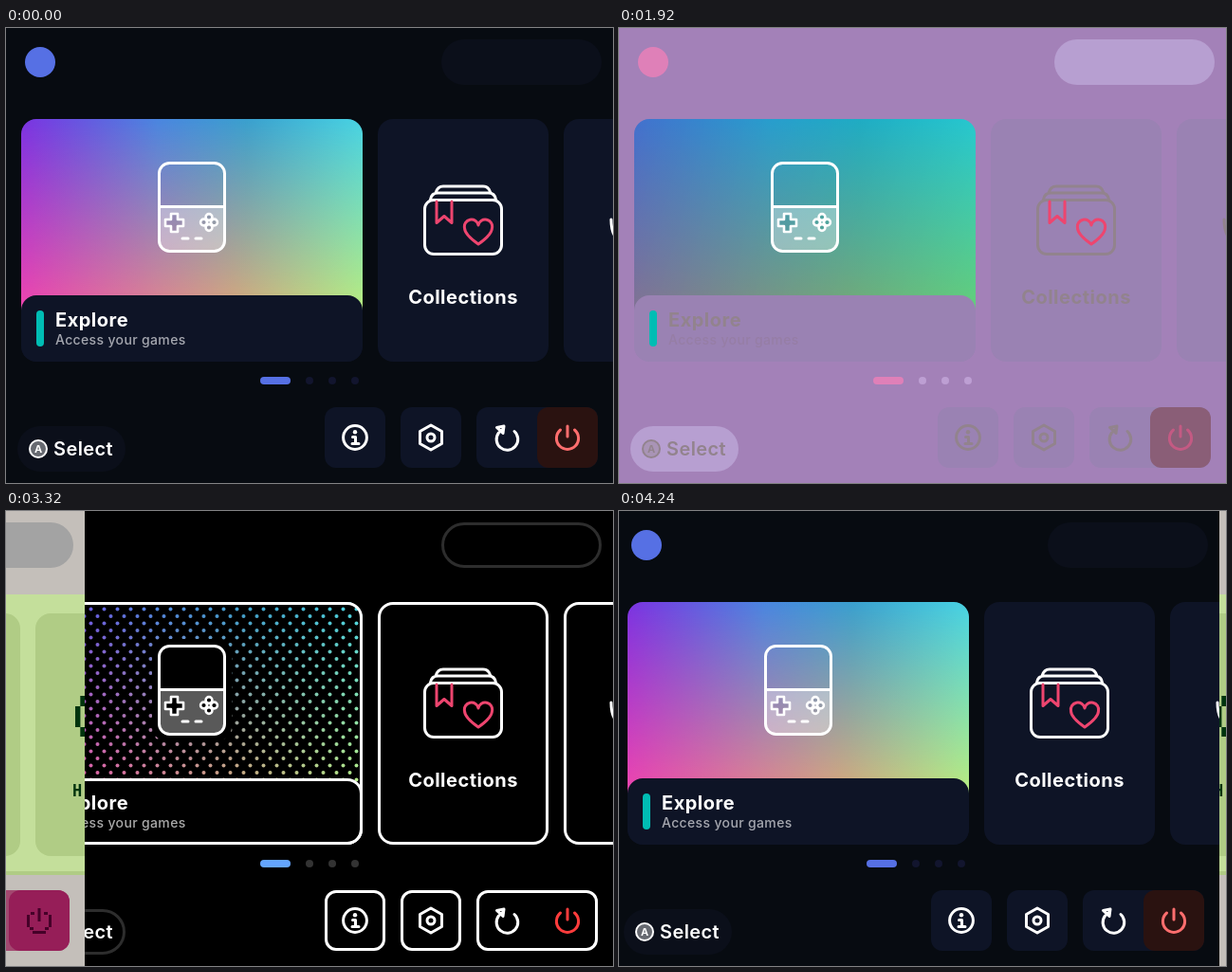
An HTML page that plays this animation: 640x480 px, repeating every 4280 ms.

```html
<!DOCTYPE html>
<html lang="en">
<head>
<meta charset="utf-8">
<title>Launcher themes</title>
<style>
html, body { margin: 0; width: 100%; height: 100%; overflow: hidden; background: #000; }
svg { display: block; width: 640px; height: 480px; }
text { font-family: Inter, "Open Sans", sans-serif; }
.title { font-size: 20px; font-weight: 700; letter-spacing: .5px; }
.sub { font-size: 14px; font-weight: 500; letter-spacing: .35px; }
.hint { font-size: 20px; font-weight: 600; letter-spacing: .4px; }
.key { font-size: 11px; font-weight: 700; text-anchor: middle; }
.mid { text-anchor: middle; }
.pixel text { font-family: "DejaVu Sans Mono", monospace; font-weight: 700; }
.pixel .title { font-size: 17px; letter-spacing: 3.8px; }
.pixel .sub { font-size: 12.5px; font-weight: 400; letter-spacing: 2.5px; }
.pixel .hint, .pixel .key { font-family: Inter, sans-serif; }
</style>
</head>
<body>
<svg id="stage" viewBox="0 0 640 480">
<defs>
  <clipPath id="screen"><path d="M0 0h640v480H0z"/></clipPath>
  <clipPath id="card"><rect x="16" y="96" width="360" height="256" rx="16"/></clipPath>
  <clipPath id="retroCard"><rect x="16" y="108" width="360" height="256" rx="16"/></clipPath>
  <linearGradient id="cool">
    <stop stop-color="#7b33e2"/><stop offset=".4" stop-color="#4a86e0"/>
    <stop offset=".66" stop-color="#3aa0cf"/><stop offset="1" stop-color="#48d3e4"/>
  </linearGradient>
  <linearGradient id="warm">
    <stop stop-color="#f045ae"/><stop offset=".62" stop-color="#d9a67c"/><stop offset="1" stop-color="#b9ec7f"/>
  </linearGradient>
  <linearGradient id="fall" x2="0" y2="1"><stop stop-color="#000"/><stop offset="1" stop-color="#fff"/></linearGradient>
  <linearGradient id="sea" x2="0" y2="1"><stop stop-color="#00bbb8"/><stop offset="1" stop-color="#00aa73"/></linearGradient>
  <linearGradient id="sky" x2="0" y2="1">
    <stop stop-color="#74d0d0"/><stop offset=".2" stop-color="#68c0bd"/><stop offset="1" stop-color="#5fae9f"/>
  </linearGradient>
  <mask id="lower" style="mask-type:luminance"><rect x="16" y="96" width="360" height="202" fill="url(#fall)"/></mask>
  <pattern id="dots" x="16" y="96" width="14" height="15" patternUnits="userSpaceOnUse">
    <g fill="#fff"><circle cx="3.5" cy="7.5" r="2"/><circle cx="10.5" cy="15" r="2"/><circle cx="10.5" cy="0" r="2"/></g>
  </pattern>
  <mask id="dotted"><rect x="16" y="96" width="360" height="202" fill="url(#dots)"/></mask>
  <filter id="soft"><feGaussianBlur stdDeviation="2.5"/></filter>
  <g id="rainbow">
    <rect x="16" y="96" width="360" height="202" fill="url(#cool)"/>
    <rect x="16" y="96" width="360" height="202" fill="url(#warm)" mask="url(#lower)"/>
  </g>
  <path id="halfHeart" d="M2 .5h4M1 1.5h1M6 1.5h1M7 2.5h1M.5 2v6M1 8.5h1M2 9.5h1M3 10.5h2M5 11.5h1M6 12.5h1M7 13.5h1"/>
</defs>
</svg>
<script>
const LOOP = 4280, STEP = 40, FADE = 88, SLIDE = 240;
const STARTS = [440, 1160, 1880, 2588.5, 3288.9, 4002.6];
const stage = document.getElementById('stage');

const rainbow = '<use href="#rainbow"/>';
const themes = [
  { bg: '#070b11', card: '#0e1426', pill: '#0b0f1a', text: '#fff', muted: '#a6a8b0', accent: '#5670e4',
    dot: '#12152e', offBg: '#2a1210', off: '#ff6e6e', art: rainbow },
  { bg: '#f8fffa', card: '#dae7f5', pill: '#ebf2f6', text: '#0d1424', muted: '#566070', accent: '#1b84ff',
    dot: '#dae4f5', offBg: '#ffd0d0', off: '#c40000', art: rainbow },
  { bg: '#edafc6', card: '#ebc1ce', pill: '#f2c5dc', text: '#371c2e', muted: '#714474', accent: '#ff4a7e',
    dot: '#fec9df', offBg: '#eb999c', off: '#cc1421', art: rainbow },
  { bg: '#4d4ba9', card: '#3b3994', pill: '#7373c4', text: '#fff', muted: '#c3c3e1', accent: '#bac2ff',
    dot: '#706ec6', offBg: '#18184c', off: '#baaff9',
    art: '<rect x="16" y="96" width="360" height="202" fill="url(#sea)"/>' },
  { bg: '#000', card: '#000', pill: '#000', text: '#fff', muted: '#aaa', accent: '#64a5ff',
    dot: '#333', offBg: 'none', off: '#ff3c3c', edge: '#fff', pillEdge: '#2d2d2d',
    art: `<path d="M16 96h360v202H16z"/><g mask="url(#dotted)">${rainbow}</g>
      <rect x="154" y="135" width="84" height="108" rx="16"/>` }
];

function box(x, y, w, h, r, fill, edge) {
  const d = edge ? 1.5 : 0;
  return `<rect x="${x + d}" y="${y + d}" width="${w - 2 * d}" height="${h - 2 * d}" rx="${r - d}" fill="${fill}"` +
    (edge ? ` stroke="${edge}" stroke-width="3"` : '') + '/>';
}
const line = (d, color, width = 3) =>
  `<path d="${d}" fill="none" stroke="${color}" stroke-width="${width}" stroke-linecap="round" stroke-linejoin="round"/>`;
const pixels = (d, color, width = 3) => `<path d="${d}" fill="none" stroke="${color}" stroke-width="${width}"/>`;
const label = (x, y, kind, color, str) => `<text x="${x}" y="${y}" class="${kind}" fill="${color}">${str}</text>`;
const ring = (x, y, r) => `M${x - r} ${y}a${r} ${r} 0 1 0 ${2 * r} 0a${r} ${r} 0 1 0 ${-2 * r} 0z`;

function selectHint(pill, text, edge, key, keyFill) {
  return box(12, 420, 114, 48, 24, pill, edge) +
    `<circle cx="34" cy="444" r="9" fill="${keyFill}" fill-opacity=".38" stroke="${key}" stroke-width="2"/>` +
    label(34, 448, 'key', key, 'A') + label(50, 451, 'hint', text, 'Select');
}

function handheld() {
  const cross = 'M174 196h7v6h6v7h-6v6h-7v-6h-6v-7h6z';
  const petals = [[214, 199.5], [208.5, 205], [219.5, 205], [214, 210.5]].map(p => ring(...p, 3.4)).join('');
  return `<path fill="#fff" fill-opacity=".35" fill-rule="evenodd"
      d="M161 189h70v36q0 11-11 11h-48q-11 0-11-11z${cross}${petals}"/>` +
    box(160, 141, 72, 96, 12.5, 'none', '#fff') + line('M162 188.5h68', '#fff') +
    line(cross + petals, '#fff', 2.6) + line('M186 222h6M200 222h6', '#fff');
}

function folder(color) {
  const red = '#ee456f';
  return box(440, 180, 84, 60, 11, 'none', color) +
    line('M447.5 181q1-7 8-7h53q7 0 8 7M453 174q2-7 8-7h42q6 0 8 7', color) +
    line('M454 183v22.5l8-7 8 7V183', red) +
    line('M498 228C488 221 483.5 216 483.5 211A7.3 7.3 0 0 1 498 208A7.3 7.3 0 0 1 512.5 211C512.5 216 508 221 498 228z', red);
}

function modern(t) {
  const { text, edge } = t;
  return `<path d="M0 0h640v480H0z" fill="${t.bg}"/>
    <circle cx="36" cy="36" r="16" fill="${t.accent}"/>` +
    box(459, 12, 169, 48, 24, t.pill, t.pillEdge) +
    `<g clip-path="url(#card)">${box(16, 96, 360, 256, 16, t.card)}${t.art}</g>` +
    handheld() + box(16, 282, 360, 70, 16, t.card, edge) +
    (edge ? box(16, 96, 360, 256, 16, 'none', edge) : '') +
    box(32, 298, 8, 38, 4, '#00bdb4') +
    label(52, 315, 'title', text, 'Explore') + label(52, 334, 'sub', t.muted, 'Access your games') +
    box(392, 96, 180, 256, 16, t.card, edge) + folder(text) + label(482, 291, 'title mid', text, 'Collections') +
    box(588, 96, 180, 256, 16, t.card, edge) + line('M638 202q0 13 5 19', text) +
    box(268, 368, 32, 8, 4, t.accent) + [320, 344, 368].map(x => box(x - 4, 368, 8, 8, 4, t.dot)).join('') +
    box(336, 400, 64, 64, 12, t.card, edge) + box(416, 400, 64, 64, 12, t.card, edge) +
    box(496, 400, 128, 64, 12, t.card, edge) + box(560, 400, 64, 64, 12, t.offBg) +
    line(ring(368, 432, 12.4) + 'M365.5 431.5h3v7M365 438.5h7', text) +
    `<circle cx="368" cy="426.3" r="2.2" fill="${text}"/>` +
    line('M448 419l11.5 6.5v13L448 445l-11.5-6.5v-13z' + ring(448, 432, 4), text) +
    line('M536 425.5A11.3 11.3 0 1 1 519.5 427L524 423M517.5 421.5l7.500-1.500-1 7.500z', text) +
    line('M584.5 424A11.6 11.6 0 1 0 599.5 424M592 420v11', t.off) +
    selectHint(t.pill, text, t.pillEdge, text, text);
}

function scenery() {
  const dark = '#1d6d62', faint = '#459489';
  return `<g clip-path="url(#retroCard)"><rect x="16" y="108" width="360" height="210" fill="url(#sky)"/>
    <g filter="url(#soft)">
      <path d="M10 236h82v14H10zM219 272h125v15H219zM345 236h40v14h-40z" fill="${dark}"/>
      <path d="M58 258h14v14H58zM58 280h14v14H58zM361 258h14v14h-14zM361 280h14v14h-14zM228 294h14v12h-14zM318 294h14v12h-14z" fill="#80c4b5" opacity=".6"/>` +
    pixels(ring(66, 173, 8) + ring(82, 173, 7) + ring(371, 173, 8) + ring(280, 209, 7) +
      'M214 176q18-8 34 0t10 18q-16 8-26-2', faint, 5) +
    pixels('M289 250l-6 10-9 8M134 283l-7 10-9 8M188 276q-18-6-16 6l14 4-2 10h-14M144 105h12', faint, 6) +
    '</g></g>';
}

function retro() {
  const leaf = '#b0cc85', ink = '#00340e', grey = '#a3a3a3', pale = '#c4bfba', wine = '#450028';
  return `<path d="M0 0h640v480H0z" fill="${pale}"/><path d="M0 88h640v296H0z" fill="#c4df9b"/>
    <circle cx="36" cy="36" r="16" fill="#4b4a94"/>` + box(459, 12, 169, 48, 24, grey) +
    [0, 164, 328, 492].map((x, i) => box(x, 380, 148, 4, 0, i ? leaf : ink)).join('') +
    scenery() + box(16, 304, 360, 60, 16, leaf) + box(32, 320, 8, 28, 4, '#00bdb4') +
    pixels('M164 160.7h65M161 163v85M231.300 163v85M164 246h11M218 246h11M175 251.500h43' +
      'M171.500 171.500h48.500v37h-48.500zM169 224h17M177.500 216v16M180 240.500h10M198 240.500h13' +
      'M211.500 219h5.500M206 224.300h5.500M217 224.300h5.500M211.500 229.600h5.500', '#fff', 5.3) +
    label(51, 332, 'title', ink, 'Explore') + label(51, 347, 'sub', '#3c6a36', 'Access your games') +
    box(392, 108, 180, 256, 16, leaf) +
    `<g transform="translate(439 179)scale(5.4)" stroke="${ink}"><use href="#halfHeart"/>
      <use href="#halfHeart" transform="translate(16)scale(-1 1)"/></g>` +
    label(425, 301, 'title', ink, 'Collect.') +
    box(588, 108, 180, 256, 16, leaf) + pixels('M638 195v11M632.700 206v22M638 228v10', ink, 5.4) +
    label(627, 301, 'title', ink, 'History') +
    box(336, 400, 64, 64, 12, '#262929') + box(416, 400, 64, 64, 12, '#262929') +
    box(496, 400, 128, 64, 12, '#a34870') + box(560, 400, 64, 64, 12, '#961e58') +
    pixels('M359 419.500h18M355.500 423v18M380.500 423v18M359 444.500h18M357 422h3M376 422h3M357 442h3M376 442h3' +
      'M366 425.500h5M365 431.500h4.500v9M365 439h8', pale) +
    pixels('M437 419.500h22M435.500 421v22M460.500 421v22M437 444.500h22M440.500 425.500h6v6h-6z' +
      'M449.500 427h8M449.500 435.500h6v5h-6zM439 436h7M439 441h5', pale, 2.6) +
    pixels('M518 425.500h15M522 421v9M526 418v15M533 429h4M537.500 429v11M533 440.500h3M519 443.500h15M517.500 436v6', wine) +
    pixels('M592 419v14M583 424.500h4M597 424.500h4M580.500 426v13M603.500 426v13M582 440.500h4M598 440.500h4M585 444.500h14', wine) +
    selectHint(grey, '#191e1e', '', '#9c1e52', '#ff4c88');
}

function scene(markup, name) {
  const g = document.createElementNS('http://www.w3.org/2000/svg', 'g');
  g.setAttribute('clip-path', 'url(#screen)');
  g.setAttribute('class', name);
  g.innerHTML = markup;
  return stage.appendChild(g);
}
const scenes = themes.map(t => scene(modern(t), 'modern'));
scenes.push(scene(retro(), 'pixel'));

function show(t) {
  const i = STARTS.findLastIndex(s => t >= s);
  const slides = i >= 4;
  const k = i < 0 ? 1 : Math.min(1, (t - STARTS[i]) / (slides ? SLIDE : FADE));
  const next = scenes[(i + 1) % scenes.length];
  const last = scenes[Math.max(i, 0)];
  for (const g of scenes) {
    g.style.display = g === next || g === last ? '' : 'none';
    g.setAttribute('opacity', 1);
    g.setAttribute('transform', 'translate(0)');
  }
  if (stage.lastElementChild !== next) stage.appendChild(next);
  if (slides) next.setAttribute('transform', `translate(${Math.round(640 * (k - 1))})`);
  else next.setAttribute('opacity', k);
}

const begin = performance.now();
function tick() {
  const t = (performance.now() - begin) % LOOP;
  show(Math.floor(t / STEP) * STEP);
  requestAnimationFrame(tick);
}
tick();
</script>
</body>
</html>
```
